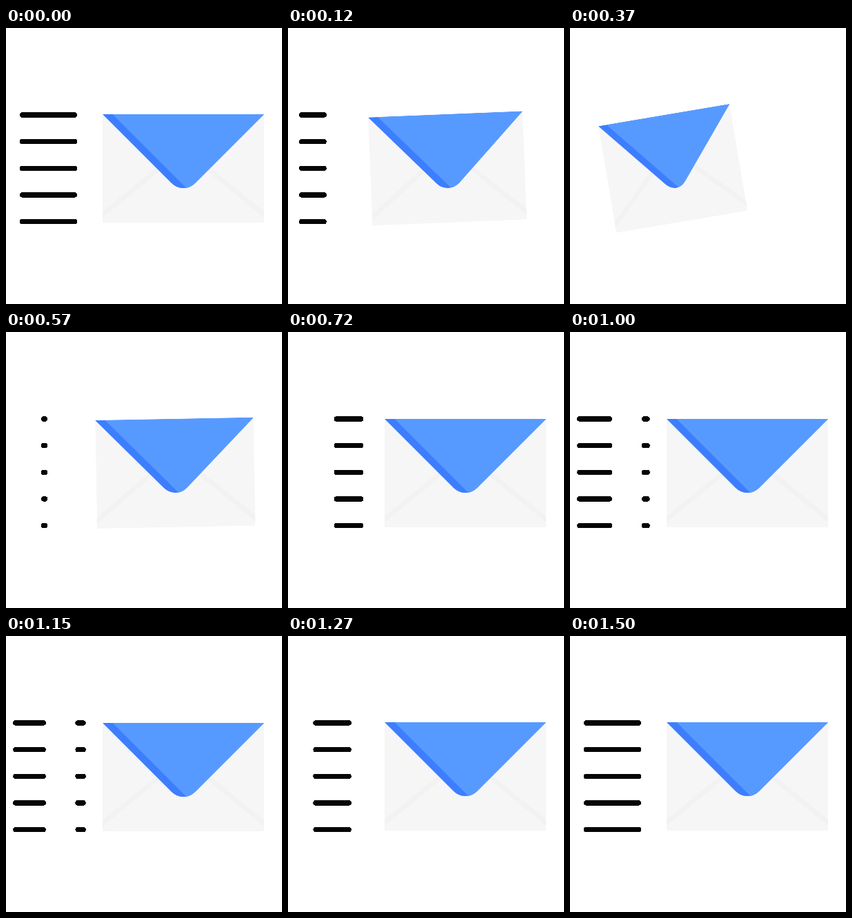
These frames come from a looping animation (400 px wide and 400 px high, 1520 ms). An HTML page:

```html
<!DOCTYPE html>
<html lang="en">
<head>
<meta charset="utf-8">
<title>Flying envelope</title>
<style>
  html, body { margin: 0; width: 100%; height: 100%; overflow: hidden; background: #fff; }
  svg { display: block; width: 100vw; height: 100vh; }
</style>
</head>
<body>
<svg viewBox="0 0 400 400">
  <defs>
    <clipPath id="sheet"><rect x="-117" y="-78.5" width="234" height="157" rx="1"/></clipPath>
    <clipPath id="flap"><path id="flapShape" d="M-117 -78.5H117L17 21.5A24 24 0 0 1 -17 21.5Z"/></clipPath>
  </defs>
  <path id="trails" fill="none" stroke="#050505" stroke-width="7.4" stroke-linecap="round" shape-rendering="crispEdges"/>
  <g id="mail">
    <g clip-path="url(#sheet)">
      <rect x="-117" y="-78.5" width="234" height="157" fill="#f6f6f6"/>
      <path d="M-119 68.5L0 -28.5L119 68.5" fill="none" stroke="#f2f2f2" stroke-width="7"/>
      <use href="#flapShape" fill="#3d7eff"/>
      <path d="M-102.5 -78.5H117V32H8Z" fill="#579aff" clip-path="url(#flap)"/>
    </g>
  </g>
</svg>
<script>
const LOOP = 1520, END = 1500;
const LEFT = 14, SPAN = 98, ROWS = 5;
const GONE = 220, BACK = 570;

const mail = document.getElementById('mail');
const trails = document.getElementById('trails');

// smooth step from 0 to 1 between two times
function ease(from, to, t) {
  const u = Math.min(1, Math.max(0, (t - from) / (to - from)));
  return u * u * (3 - 2 * u);
}

function drawMail(t) {
  const pull = ease(0, 380, t) - ease(380, 620, t);
  const sink = ease(380, 620, t) - ease(1150, 1270, t);
  mail.setAttribute('transform',
    `translate(${257 - 108 * pull} ${203.5 + sink}) rotate(${-9.6 * pull}) scale(${1 - 0.176 * pull} 1)`);
}

// middle and length of a stroke on its wrapping track
function stroke(t) {
  if (t < BACK - 10) {
    const fade = 1 - ease(0, GONE, t);
    return { mid: 3 + 44.5 * fade, len: 76 * fade };
  }
  const u = Math.max(0, (t - BACK) / (END - BACK));
  const run = u - 0.039 * Math.sin(2 * Math.PI * u) + 0.008 * Math.sin(4 * Math.PI * u);
  return {
    mid: 42 - (5 * SPAN - 5.5) * run,
    len: 2 + 46 * ease(BACK, 800, t) + 28 * ease(1290, END, t)
  };
}

function drawTrails(t) {
  const { mid, len } = stroke(t);
  const start = (((mid - len / 2) % SPAN) + SPAN) % SPAN;
  const end = start + len;
  const parts = [];
  if (len > 0) parts.push([start, Math.min(end, SPAN)]);
  if (end > SPAN) parts.push([0, end - SPAN]);

  let d = '';
  for (let i = 0; i < ROWS; i++) {
    for (const [a, b] of parts) d += `M${LEFT + a} ${126 + 38.65 * i}H${LEFT + b}`;
  }
  trails.setAttribute('d', d);
}

function frame() {
  const t = Math.min(performance.now() % LOOP, END);
  drawMail(t);
  drawTrails(t);
  requestAnimationFrame(frame);
}
frame();
</script>
</body>
</html>
```
